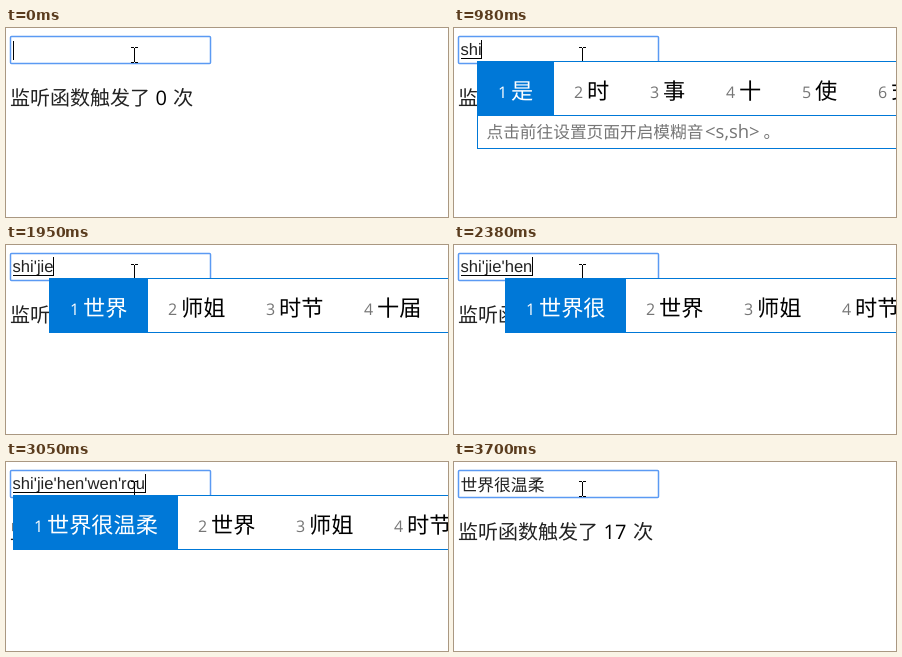
Animation, 442 px wide and 189 px high, one loop 4.15 s. Source, as an HTML page:

```html
<!DOCTYPE html>
<html lang="zh-CN">
<head>
<meta charset="utf-8">
<style>
  html, body { margin: 0; width: 100%; height: 100%; overflow: hidden; background: #fff; }
  svg { display: block; width: 442px; height: 189px; }
  text { font-family: "Noto Sans CJK SC", "Noto Sans CJK", sans-serif; text-rendering: geometricPrecision; white-space: pre; }
  .latin { font-family: "Liberation Sans", Arial, sans-serif; }
  .ui { font-family: "Open Sans", "Noto Sans", sans-serif; }
</style>
</head>
<body>
<svg id="stage" viewBox="0 0 442 189"></svg>
<script>
const LOOP = 4150, COMMIT = 3150;
const INPUT_X = 6.5, LATIN = 16.6;
const GRAY = '#767676', INK = '#222', ACCENT = '#0078d7';
const stage = document.getElementById('stage');
const pen = document.createElement('canvas').getContext('2d');

// [start, typed letters, candidates, shows the fuzzy hint]
const steps = [
  [760, "s", '是 说 上 时 三 四'],
  [870, "sh", '是 说 上 时 十 事', true],
  [980, "shi", '是 时 事 十 使 式', true],
  [1520, "shi'j", '时间 实际 事件 世界'],
  [1620, "shi'j", '时间 实际 事件 世界', true],
  [1850, "shi'ji", '实际 世纪 时机 事迹'],
  [1950, "shi'jie", '世界 师姐 时节 十届'],
  [2290, "shi'jie'he", '世界和 世界 师姐 时节'],
  [2380, "shi'jie'hen", '世界很 世界 师姐 时节'],
  [2600, "shi'jie'hen'w", '世界很晚 世界 师姐 时节'],
  [2710, "shi'jie'hen'we", '世界很微 世界 师姐 时节'],
  [2820, "shi'jie'hen'wen", '世界很稳 世界 师姐 时节'],
  [2940, "shi'jie'hen'wen'r'o", '世界很温热哦 世界 师姐 时节'],
  [3050, "shi'jie'hen'wen'rou", '世界很温柔 世界 师姐 时节']
];

const rect = (x, y, w, h, fill) =>
  `<rect x="${x}" y="${y}" width="${w}" height="${h}" fill="${fill}"/>`;
const label = (x, y, size, str, fill = '#000', cls = '') =>
  `<text x="${x}" y="${y}" font-size="${size}" fill="${fill}" class="${cls}">${str}</text>`;
const caret = (x, y) => rect(x, y, 1, 19, '#000');

function page(count) {
  const end = 167 + 12 * (String(count).length - 1);
  return label(4, 77, 20, '监听函数触发了', INK) + label(149.6, 77, 20, count, '#000', 'ui') +
    label(end, 77, 20.3, '次', INK) +
    '<rect x="4.5" y="8.5" width="200" height="27" rx="1" fill="#fff" stroke="#5b9af3" stroke-width="1.5"/>';
}

function popup(caretX, words, hint) {
  const left = Math.min(caretX - 4, 117 - 22 * words[0].length);
  const bottom = hint ? 121 : 88;
  let out = rect(left, 33, 460, bottom - 33, '#fff');
  let x = left + 1;
  words.forEach((word, i) => {
    const width = 54 + 22 * word.length;
    if (!i) out += rect(left, 33, width + 1, 55, ACCENT);
    out += label(x + 20, 70, 16, i + 1, i ? GRAY : '#fff', 'ui') +
      label(x + 33, 71, 22.2, word, i ? '#000' : '#fff');
    x += width;
  });
  out += rect(left, 33, 460, 1, ACCENT) + rect(left, 87, 460, 1, ACCENT);
  if (hint) {
    out += rect(left, 88, 1, 33, ACCENT) + rect(left, 120, 460, 1, ACCENT) +
      label(left + 9.5, 110, 16.7, '点击前往设置页面开启模糊音', GRAY) +
      label(left + 228, 110, 18.5, '&lt;s,sh&gt;', GRAY, 'ui') +
      label(left + 286.5, 110, 16.7, '。', GRAY);
  }
  return out;
}

const pointer = rect(128, 20, 1, 14, '#000') +
  [19, 34].map(y => rect(125, y, 3, 1, '#000') + rect(129, y, 3, 1, '#000')).join('');

function composing([, typed, words, hint]) {
  pen.font = `${LATIN}px "Liberation Sans", Arial, sans-serif`;
  const x = Math.floor(INPUT_X + pen.measureText(typed).width);
  return label(INPUT_X, 27, LATIN, typed, INK, 'latin') +
    rect(7, 30, x - 7, 1, '#000') + caret(x, 12) + pointer + popup(x, words.split(' '), hint);
}

function scene(t) {
  const base = page(t < COMMIT ? 0 : 17);
  if (t < steps[0][0]) return base + (t < 330 ? caret(7, 13) : '') + pointer;
  if (t < COMMIT) return base + composing(steps.filter(s => s[0] <= t).pop());
  return base + label(INPUT_X, 29, 16.8, '世界很温柔', INK) + (t < 3700 ? caret(89, 14) : '') + pointer;
}

let shown = '';
function frame() {
  const next = scene(performance.now() % LOOP);
  if (next !== shown) stage.innerHTML = shown = next;
  requestAnimationFrame(frame);
}
frame();
</script>
</body>
</html>
```
